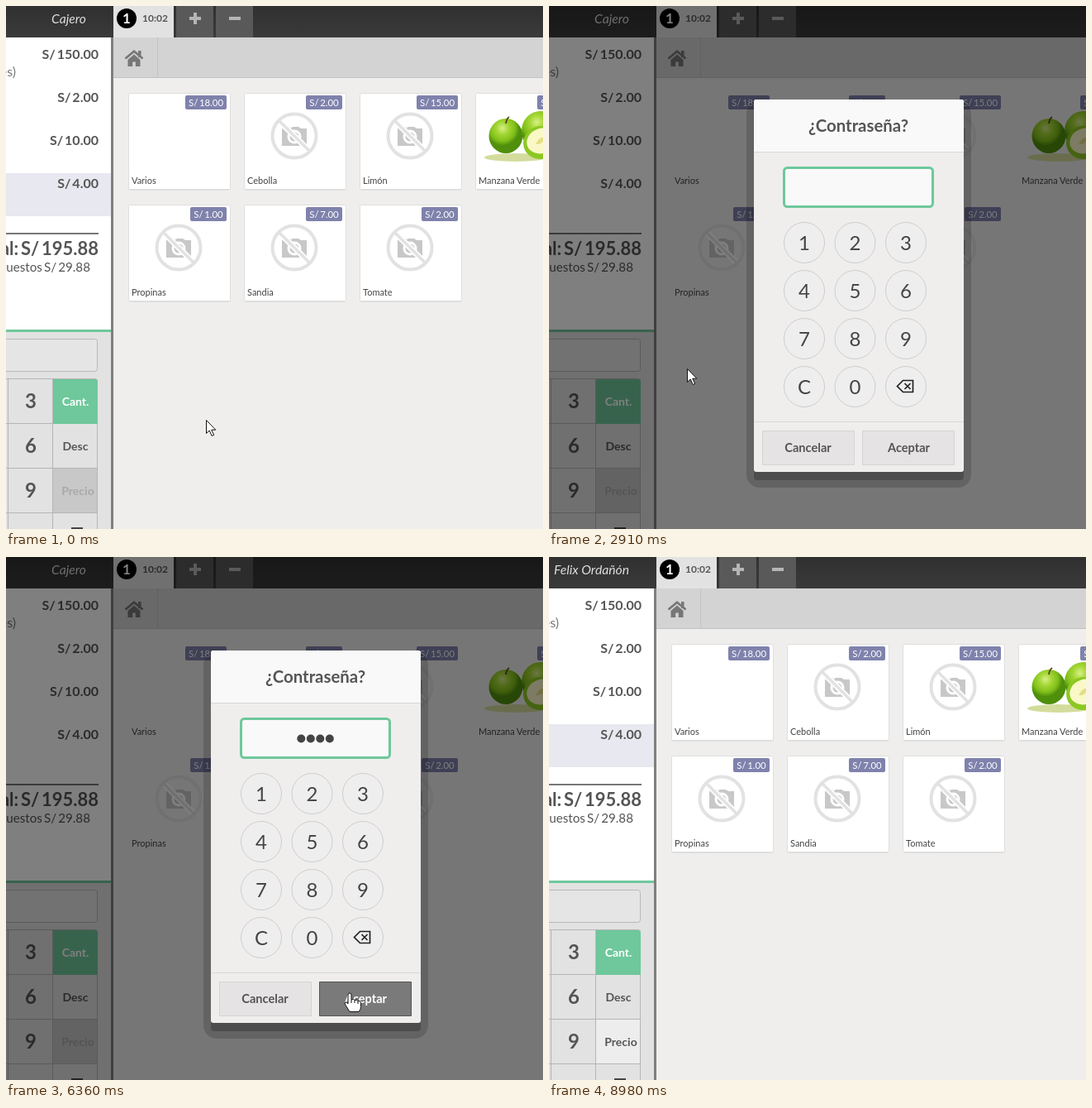
Write an HTML page that moves like this. It is 650 px wide and 632 px high and loops after 10000 ms.

```html
<!DOCTYPE html>
<html lang="es">
<head>
<meta charset="utf-8">
<title>Cambio de cajero</title>
<style>
html, body { margin: 0; width: 100%; height: 100%; overflow: hidden; background: #efeeed; }
svg { display: block; width: 650px; height: 632px; font-family: Lato, sans-serif; fill: #555; }
.b { font-weight: 700; }
.m { text-anchor: middle; }
.e { text-anchor: end; }
.money { word-spacing: -.12em; }
.line { stroke: #b5b5b5; fill: none; }

.card, .mark, .dim, .list, .login, .before, .after, .hand, .arrow, .dots, .accept, .acceptText, .price, .priceText, .cursor, .press {
  animation: 10s step-end infinite;
}
.card { fill: #fff; stroke: #dedede; animation-name: card; }
.mark { fill: #e8e8f0; animation-name: mark; }
.dim { animation-name: dim; }
.list { animation-name: list; }
.login { animation-name: login; }
.before { animation-name: before; }
.after { animation-name: after; }
.dots { fill: #444; animation-name: dots; }
.accept { animation-name: accept; }
.acceptText { animation-name: acceptText; }
.price { fill: #c8c8c8; animation-name: price; }
.priceText { fill: #a9a9a9; animation-name: priceText; }
.cursor { animation-name: move; }
.arrow { fill: #fff; stroke: #111; animation-name: arrow; }
.hand { fill: #fff; stroke: #111; stroke-linejoin: round; animation-name: hand; }
.key { fill: #efeeee; stroke: #cdcbcc; }
.press { animation-name: press; }

@keyframes card { 13.8% { fill: #efeeed; stroke: #efeeed; } 65.1% { fill: #fff; stroke: #dedede; } }
@keyframes mark { 13.8% { fill: #fff; } 65.1% { fill: #e8e8f0; } }
@keyframes dim { 0%, 65.1%, 100% { visibility: hidden; } 13.8% { visibility: visible; } }
@keyframes list { 0%, 29.1%, 100% { visibility: hidden; } 13.8% { visibility: visible; } }
@keyframes login { 0%, 65.1%, 100% { visibility: hidden; } 29.1% { visibility: visible; } }
@keyframes before { 0% { visibility: visible; } 65.1%, 100% { visibility: hidden; } }
@keyframes after { 0% { visibility: hidden; } 65.1%, 100% { visibility: visible; } }
@keyframes accept { 0%, 65.1%, 100% { fill: #e5e3e4; } 63.6% { fill: #7a7a7a; stroke: #555; } }
@keyframes acceptText { 63.6% { fill: #fff; } 65.1% { fill: #555; } }
@keyframes price { 0% { fill: #c8c8c8; } 65.1% { fill: #d3d3d3; } 66.3%, 100% { fill: #ededed; } }
@keyframes priceText { 0% { fill: #a9a9a9; } 65.1%, 100% { fill: #555; } }
@keyframes press { 0% { fill: #6ec89b; stroke: #6ec89b; } 1.2%, 100% { fill: #efeeee; stroke: #cdcbcc; } }
@keyframes dots {
  0%, 65.1%, 100% { transform: translateX(374.5px); clip-path: inset(0 100% 0 0); }
  39.1% { transform: translateX(369px); clip-path: inset(0 75% 0 0); }
  42.7% { transform: translateX(363.4px); clip-path: inset(0 50% 0 0); }
  45.1% { transform: translateX(357.8px); clip-path: inset(0 25% 0 0); }
  52.6% { transform: translateX(352px); clip-path: inset(0 0 0 0); }
}
@keyframes hand {
  0%, 13.8%, 65.1%, 100% { visibility: hidden; }
  11%, 63.6% { visibility: visible; }
}
@keyframes arrow {
  0%, 13.8%, 65.1%, 100% { visibility: visible; }
  11%, 63.6% { visibility: hidden; }
}
@keyframes move {
  0% { transform: translate(242px, 500px); animation-timing-function: steps(8); }
  9.6% { transform: translate(83px, 29px); }
  11% { transform: translate(85px, 15px); }
  15.4% { transform: translate(85px, 15px); animation-timing-function: steps(7); }
  23.8% { transform: translate(167px, 438px); }
  30.4% { transform: translate(167px, 438px); animation-timing-function: steps(6); }
  37.6% { transform: translate(305px, 286px); }
  37.9% { transform: translate(305px, 286px); animation-timing-function: steps(3); }
  41.5% { transform: translate(364px, 288px); animation-timing-function: steps(2); }
  43.9% { transform: translate(424px, 290px); }
  45.1% { transform: translate(424px, 290px); animation-timing-function: steps(2); }
  47.5% { transform: translate(359px, 311px); }
  47.8% { transform: translate(359px, 311px); animation-timing-function: steps(3); }
  51.4% { transform: translate(306px, 340px); }
  52.6% { transform: translate(306px, 340px); animation-timing-function: steps(5); }
  58.6% { transform: translate(416px, 527px); }
  65.1% { transform: translate(416px, 527px); animation-timing-function: steps(3); }
  68.7% { transform: translate(366px, 563px); }
  69% { transform: translate(366px, 563px); animation-timing-function: steps(9); }
  79.8% { transform: translate(82px, 576px); animation-timing-function: steps(4); }
  84.6% { transform: translate(100px, 593px); }
  87.4% { transform: translate(100px, 593px); animation-timing-function: steps(2); }
  89.8%, 100% { transform: translate(118px, 640px); }
}
</style>
</head>
<body>
<svg viewBox="0 0 650 632">
  <defs>
    <linearGradient id="bar" x2="0" y2="1"><stop stop-color="#303030"/><stop offset="1" stop-color="#3a3a3a"/></linearGradient>
    <radialGradient id="apple" cx=".4" cy=".28"><stop stop-color="#d8f08a"/><stop offset=".35" stop-color="#a6d837"/><stop offset=".75" stop-color="#7fbe18"/><stop offset="1" stop-color="#4f8f0c"/></radialGradient>
    <g id="camera">
      <path d="M-15-9h5v-2h5v2l3-2h7l3 2h7v21h-30z" fill="#c8c8c8"/>
      <circle r="7" cy="1" fill="none" stroke="#fff" stroke-width="3"/>
      <path d="M-19-19L19 19" stroke="#fff" stroke-width="7"/>
      <path d="M-19-19L19 19" stroke="#e2e2e2" stroke-width="3.500"/>
      <circle r="26.500" fill="none" stroke="#e2e2e2" stroke-width="4"/>
    </g>
    <g id="apples">
      <ellipse cx="38" cy="56" rx="38" ry="5" fill="#d3dc9c"/>
      <ellipse cx="26" cy="30" rx="20.500" ry="21" fill="url(#apple)"/>
      <ellipse cx="68" cy="24" rx="23" ry="24" fill="url(#apple)"/>
      <path d="M26 15q1-6 4-8" fill="none" stroke="#5c4a20" stroke-width="2"/>
      <ellipse cx="68" cy="38" rx="21" ry="20" fill="#8cc822" transform="rotate(-20 68 38)"/>
      <ellipse cx="69" cy="36" rx="18" ry="15" fill="#fbf8c8" transform="rotate(-20 69 36)"/>
      <path d="M62 40q5-10 11-8q-2 9-11 8" fill="#e6de84"/>
    </g>
  </defs>

  <!-- Product area -->
  <path d="M0 0h650v632H0z" fill="#efeeed"/>
  <path d="M130 38h520v48H130z" fill="#d3d3d3"/>
  <path d="M130 86.500h520M183.500 38v48" stroke="#c3c3c3"/>
  <g fill="#777">
    <path d="M160 54h3.500v8H160zM147.500 65l7.500-6.500 7.500 6.500v8h-5.700v-5.500h-3.600v5.500h-5.700z"/>
    <path d="M144.500 63.500L155 54.700l10.500 8.800" fill="none" stroke="#777" stroke-width="2.700"/>
  </g>
  <g id="cards"></g>

  <!-- Order and keypad -->
  <path d="M0 38h127v354H0z" fill="#fff"/>
  <path class="mark" d="M0 202h127v52H0z"/>
  <g id="prices" class="b e money" font-size="16"></g>
  <text x="12" y="85" class="e" font-size="16" fill="#777">unidad(es)</text>
  <path d="M0 274h112v2H0z" fill="#777"/>
  <text x="112" y="301" class="b e money" font-size="22">Total: S/ 195.88</text>
  <text x="102" y="321" class="e money" font-size="15.200">Impuestos S/ 29.88</text>
  <path d="M0 394h127v238H0z" fill="#e2e2e2"/>
  <path d="M0 391h127v3H0z" fill="#6ec89b"/>
  <rect x="-20" y="402.500" width="130.500" height="39" rx="3" fill="#e5e5e5" stroke="#b8b8b8"/>
  <path class="price" d="M57 559h54v53H57z"/>
  <path class="line" d="M0 450.500h108q2.500 0 2.500 3V632M0 504.500h111M0 558.500h111M0 612.500h111M2.500 450v182M56.500 450v182"/>
  <path d="M57 451h51q3 0 3 3v51H57z" fill="#6ec89b"/>
  <g class="b m" font-size="24"><text x="30" y="486">3</text><text x="30" y="540">6</text><text x="30" y="594">9</text></g>
  <g class="b m" font-size="14">
    <text x="84" y="483" fill="#fff">Cant.</text><text x="84" y="537">Desc</text>
    <text x="87" y="591" class="priceText">Precio</text>
  </g>
  <path d="M79 630h14v2H79z" fill="#444"/>
  <path d="M127 38h3v594h-3z" fill="#7f7f7f"/>

  <!-- Top bar -->
  <path d="M0 0h650v38H0z" fill="url(#bar)"/>
  <g class="e" font-size="15.700" font-style="italic" fill="#ddd">
    <text x="97" y="21" class="before">Cajero</text>
    <text x="97" y="21" class="after">Felix Ordañón</text>
  </g>
  <path d="M130 0h73v38h-73z" fill="#e2e2e2"/>
  <path d="M206 0h45v38h-45zM254 0h45v38h-45z" fill="#595959"/>
  <circle cx="146" cy="15" r="12" fill="#000"/>
  <text x="146" y="21" class="b m" font-size="17" fill="#fff">1</text>
  <text x="180.500" y="19" class="b m" font-size="12">10:02</text>
  <path d="M222 15h14M229 8v14M270 15h14" stroke="#b5b5b5" stroke-width="4"/>

  <path class="dim" d="M0 0h650v632H0z" fill="#000" opacity=".5"/>

  <!-- Cashier list -->
  <g class="list">
    <rect x="116" y="139" width="518" height="418" rx="16" opacity=".16" fill="#000"/>
    <rect x="125" y="148" width="500" height="399" rx="4" opacity=".22" fill="#000"/>
    <rect x="125" y="138" width="500" height="400" rx="3" fill="#efeeed"/>
    <path d="M125 204v-63q0-3 3-3h494q3 0 3 3v63z" fill="#f7f7f7"/>
    <path d="M125 201h500v3H125z" fill="#e0e0e0"/>
    <text x="374.500" y="177" class="b m" font-size="20.400">Cambiar Cajero</text>
    <g id="rows" class="b" font-size="16"></g>
    <path d="M125 477.500h500" stroke="#d8d8d8"/>
    <path d="M503.500 488.500h111v41h-111z" fill="#e5e5e5" stroke="#dadada"/>
    <text x="558.500" y="514" class="b m" font-size="14.600">Cancelar</text>
  </g>

  <!-- Password -->
  <g class="login">
    <rect x="239" y="114" width="272" height="468" rx="16" opacity=".16" fill="#000"/>
    <rect x="248" y="123" width="254" height="450" rx="4" opacity=".22" fill="#000"/>
    <rect x="248" y="113" width="254" height="450" rx="3" fill="#efeeed"/>
    <path d="M248 176v-60q0-3 3-3h248q3 0 3 3v60z" fill="#f9f9f9"/>
    <path d="M248 176.500h254M248 502.500h254" stroke="#d8d8d8"/>
    <text x="374.500" y="152" class="b m" font-size="20.400">¿Contraseña?</text>
    <rect x="284.500" y="195.500" width="180" height="47" rx="4" fill="#f9f9f9" stroke="#6ec89b" stroke-width="3"/>
    <g class="dots" id="dots"></g>
    <g id="keys" class="m" font-size="24"></g>
    <g fill="none" stroke="#222" stroke-width="1.700"><path d="M421.500 459.500l7-7h12v14h-12z"/><path d="M430.500 456l7 7m0-7l-7 7"/></g>
    <path d="M258.500 513.500h111v41h-111z" fill="#e5e3e4" stroke="#d5d3d4"/>
    <path class="accept" d="M379.500 513.500h111v41h-111z" stroke="#d5d3d4"/>
    <g class="b m" font-size="14.600">
      <text x="313.500" y="539">Cancelar</text>
      <text x="435.500" y="539" class="acceptText">Aceptar</text>
    </g>
  </g>

  <g class="cursor">
    <path class="arrow" d="M.5.5v16l3.700-3.500 3 6.500 2.500-1.100-3-6.200h5.100z"/>
    <g class="hand">
      <path d="M-2 12V2q0-2 2-2t2 2v6q3-1.500 4 .5 3-1 4 1 3.500-.5 3.500 2v5q0 3-2.500 6H0l-5-8q-2-3 0-3.500 1.500 0 3 2z"/>
      <path d="M2 8v4M6 9v3M10 10v3" fill="none"/>
    </g>
  </g>
</svg>
<script>
const fill = (id, items, draw) => { document.getElementById(id).innerHTML = items.map(draw).join(''); };

const products = [
  ['Varios', '18.00'], ['Cebolla', '2.00'], ['Limón', '15.00'], ['Manzana Verde', '3.00'],
  ['Propinas', '1.00'], ['Sandia', '7.00'], ['Tomate', '2.00'],
];
fill('cards', products, ([name, price], i) => {
  const x = 149 + i % 4 * 140, y = 106 + Math.floor(i / 4) * 135;
  const w = price.length > 4 ? 50 : 44;
  const picture = i === 0 ? '' : i === 3 ? '<use href="#apples" x="10" y="21"/>' : '<use href="#camera" x="60" y="51"/>';
  return `<g transform="translate(${x} ${y})">
    <rect class="card" x="-.5" y="-.5" width="123" height="117" rx="2"/>
    <path class="card" d="M0 115.500h122"/>${picture}
    <rect x="${118 - w}" y="2" width="${w}" height="17" rx="2" fill="#7f82ac"/>
    <text class="m money" x="${118 - w / 2}" y="15" font-size="11.400" fill="#fff">S/ ${price}</text>
    <text x="3" y="109" font-size="11" fill="#444">${name}</text></g>`;
});

fill('prices', ['150.00', '2.00', '10.00', '4.00'], (p, i) => `<text x="112" y="${64 + i * 52}">S/ ${p}</text>`);

const cashiers = ['Cajero', 'Delfina Torrealvar', 'Elisa Marzo', 'Tobías Luren', 'Felix Ordañón'];
fill('rows', cashiers, (name, i) => {
  const y = 204 + i * 50, color = i === 0 ? '#6ec89b' : i % 2 ? '#e5e5e5' : '#f7f7f7';
  return `<rect x="125" y="${y}" width="500" height="50" fill="${color}"/><text x="140.500" y="${y + 31}">${name}</text>`;
});

// Start of each key press in seconds
const presses = { 1: 3.76, 2: 4.15, 3: 4.39, 4: 5.14 };
fill('keys', [...'123456789C0', ''], (k, i) => {
  const x = 309 + i % 3 * 61.5, y = 286 + Math.floor(i / 3) * 58;
  const press = presses[k] ? ` press" style="animation-delay:${presses[k]}s` : '';
  return `<circle class="key${press}" cx="${x}" cy="${y}" r="24.500"/><text x="${x}" y="${y + 9}" fill="#444">${k}</text>`;
});

fill('dots', [0, 1, 2, 3], i => `<circle cx="${5.3 + i * 11.5}" cy="219.500" r="5"/>`);
</script>
</body>
</html>
```
